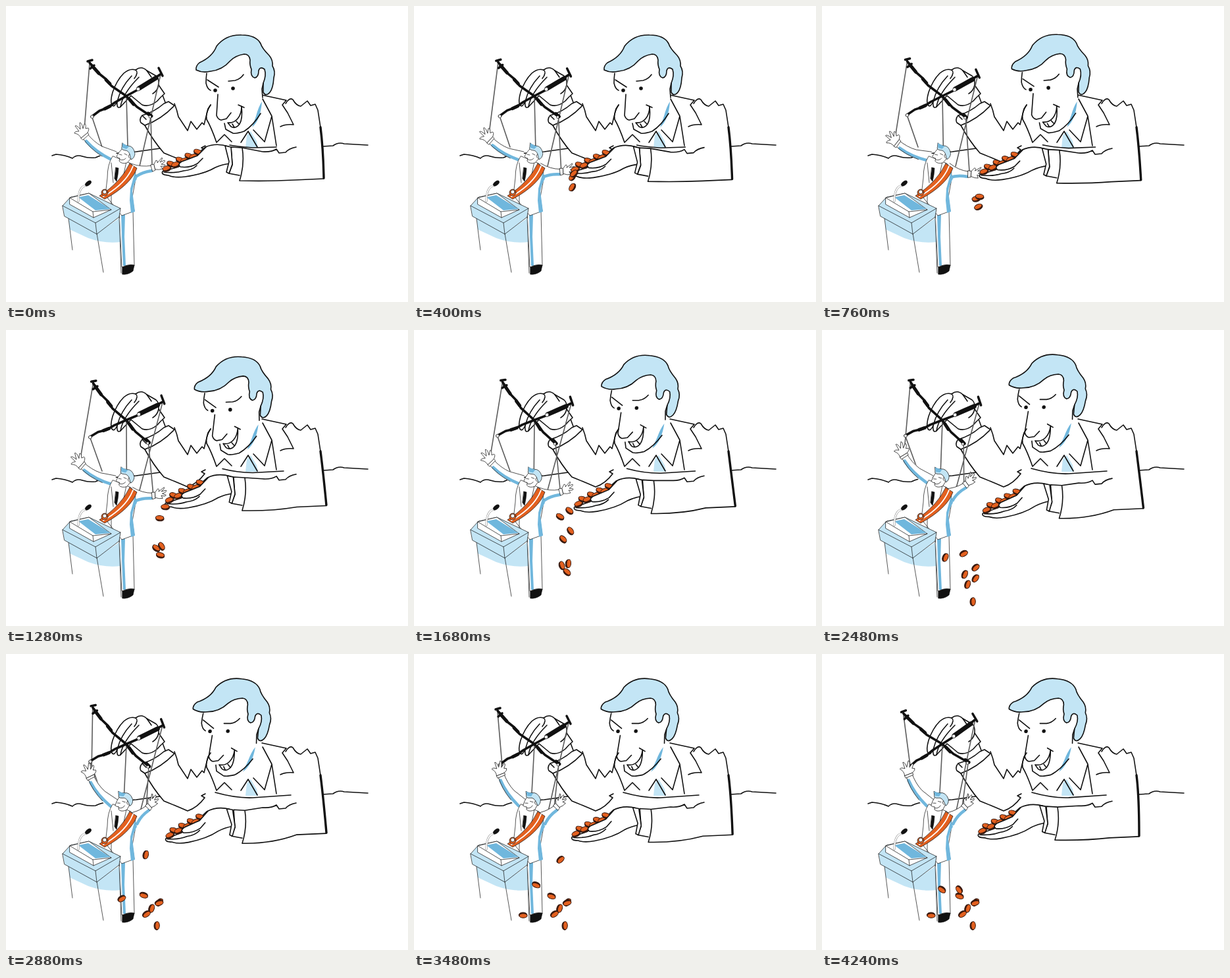
An HTML page that plays this animation: 611x449 px, repeating every 4.28 s.

```html
<!DOCTYPE html>
<html lang="en">
<head>
<meta charset="utf-8">
<title>Puppeteer</title>
<style>
html, body { margin: 0; width: 100%; height: 100%; overflow: hidden; background: #fff; }
svg { display: block; width: 100vw; height: 100vh; }
path, ellipse, circle { fill: none; stroke: #111; stroke-linecap: round; stroke-linejoin: round; }
.big { stroke-width: 1.6; }
.thin path, .thin circle { stroke-width: .7; }
svg .w { fill: #fff; }
svg .sky { fill: #c3e5f5; }
svg .mid { fill: #70b7dd; stroke: none; }
svg .shade { stroke: #70b7dd; stroke-width: 4.5; }
svg .ink { fill: #111; }
svg .red { fill: #e3601f; }
svg .plain { stroke: none; }
svg .stripe { stroke: #fff; stroke-width: 1.8; }
.string { stroke: #5c5c5c; stroke-width: 1.6; }
.coin ellipse { stroke: #38190f; stroke-width: 1; fill: #38190f; }
.coin .red { fill: #e3601f; }
</style>
</head>
<body>
<svg viewBox="0 0 611 449">
  <path class="big" d="M70 227L76 225Q90 226 101 231Q107 225 116 228T136 230Q146 225 160 224L198 221L234 216M481 213L497 212Q505 206 514 209L550 211"/>

  <!-- body -->
  <g class="big">
    <path class="sky plain" d="M366 196L372 190L381 205L383 215H364Z"/>
    <path d="M311 150Q303 162 305 172Q312 184 320 207L332 195L343 206"/>
    <path d="M389 135L426 143L420 150L428 162L437 180Q425 179 417 183M390 141L404 167L393 206L376 188M404 167L411 212M357 207L368 190L382 214"/>
    <path d="M425 148Q431 138 436 142Q441 151 448 152L458 144L463 151L470 149L474 158L478 184"/>
    <path id="base"/>
  </g>

  <!-- head -->
  <g id="head" class="big">
    <path class="w plain" d="M304 102L310 124L322 134L320 168L333 187L345 193L362 190L387 163L390 131L395 98L369 73L335 86Z"/>
    <path class="mid" d="M389 145Q384 152 380 167L374 184Q387 173 389 145Z"/>
    <path class="sky" d="M289 97Q288 91 294 86Q314 77 320 61Q334 43 358 44Q380 44 387 57Q389 64 400 75Q406 82 405 91Q410 99 407 109Q406 125 401 131Q395 138 391 131L391 117Q396 105 393 96Q386 91 384 98Q384 108 378 109Q371 107 373 96Q370 89 371 82Q370 73 362 73Q349 75 341 83Q329 97 311 99Q299 102 289 97Z"/>
    <path d="M305 102Q304 109 304 117Q306 126 311 128M391 117L389 126L390 139M387 163Q376 181 362 190Q350 194 345 193L334 187L332 178"/>
    <path d="M306 112L323 123M338 114L348 113Q356 111 361 104M322 134L320 166Q322 172 327 173L335 171L342 162"/>
    <path class="w" d="M353 150L362 154M358 152Q358 164 352 171Q346 178 337 177L342 183Q349 187 355 179Q360 171 358 152M344 179L347 184M350 175L354 179"/>
    <circle class="ink plain" cx="318" cy="128" r="2.8"/>
    <circle class="ink plain" cx="345" cy="125" r="2.8"/>
  </g>

  <!-- raised arm and hand -->
  <g class="big">
    <path d="M256 148Q260 158 262 168L276 189L281 175L290 187L298 177L301 180L307 156L311 150M211 181Q224 205 240 223Q260 231 276 238Q291 233 302 218L297 215L303 212"/>
    <path class="w" d="M205 177Q202 171 207 166Q225 161 240 148L247 145L256 151Q236 172 211 181Z"/>
    <path d="M236 130L242 146M207 166L213 172"/>
    <path class="w" d="M161 150Q158 145 162 131Q168 113 179 102Q188 94 197 97Q206 90 214 98L228 106Q233 110 232 120L241 133Q234 139 230 144Q218 154 207 150L190 136L174 153Q168 157 169 145Q164 155 161 150Z"/>
    <path d="M169 145Q174 124 191 106M174 153Q177 133 202 108M197 97Q202 101 195 110M214 98L221 108M232 120Q230 129 223 133"/>
  </g>

  <path id="strings" class="string"/>
  <g id="cross">
    <path stroke-width="3.6" d="M127 86L142 103L152 111L160 121L182 136L199 153L220 167M130 168L142 159L155 154L166 146L182 137L204 125L234 104"/>
    <path stroke-width="5" d="M131 91L141 102M152 112L158 118M150 156L158 152M188 142L194 149M216 163L221 167"/>
    <path stroke-width="7" d="M202 125L215 117L228 109"/>
    <path stroke-width="3.5" d="M124 84L131 82M128 95L134 90M232 94L238 106"/>
    <g class="thin">
      <circle class="w" cx="131" cy="168" r="2.4"/><circle class="w" cx="219" cy="168" r="2"/>
      <circle class="w" cx="201" cy="126" r="2.8"/>
    </g>
  </g>

  <!-- puppet -->
  <g class="thin">
    <path class="w" d="M172 312L176 396L195 394L193 311Z"/>
    <path class="mid" d="M175 316L181 316L180 350L182 394L178 394L176 350Z"/>
    <path class="ink" d="M177 396Q186 391 195 393L193 402Q186 408 177 407Z"/>
    <g id="armL">
      <path class="w plain" d="M122 193L145 213L168 221L164 242L144 228L118 201Z"/>
      <path class="shade" d="M122 205Q136 221 160 233"/>
      <path d="M123 193Q133 206 146 213L168 221M117 201Q127 216 146 228"/>
      <path class="w" d="M114 200L124 192L126 195L117 203Z"/>
      <path class="w" d="M114 200Q111 194 104 193Q104 190 111 190L105 182Q107 180 113 187L112 177Q115 176 117 186L119 179Q122 178 121 186L125 185Q127 187 124 192Z"/>
    </g>
    <g id="armR">
      <path class="w plain" d="M190 239L208 243L222 242L223 250L196 262Z"/>
      <path class="shade" d="M196 260Q206 252 221 250"/>
      <path d="M190 239Q206 245 221 242"/>
      <path class="w" d="M220 241L225 240L227 249L223 251Z"/>
      <path class="w" d="M225 240L228 234Q231 234 230 238L237 230Q239 231 234 237L241 234Q243 236 236 240L242 241Q242 244 235 243L238 247Q233 249 227 248Z"/>
    </g>
    <path class="w" d="M162 228Q154 240 154 261L151 287L163 302L176 318L195 311L192 290L196 268Q200 250 190 239L178 234Z"/>
    <path class="mid" d="M196 252L199 262Q194 270 192 281L196 312L190 314L188 295L189 277Z"/>
    <path d="M160 238L163 268M183 236L176 269M160 277V300"/>
    <path class="ink" d="M167 245L171 246L170 256L168 266L165 262Z"/>
    <path class="red" d="M188 239L199 246Q190 271 150 293L142 288Q174 268 188 239Z"/>
    <path class="stripe" d="M193 243Q183 269 148 289"/>
    <circle class="red" cx="150" cy="283" r="5"/><circle class="w" cx="150" cy="282" r="3"/>
    <g id="face">
      <path class="w" d="M177 216Q171 222 168 228Q170 231 173 231L172 235Q175 240 184 238L191 230L187 216Z"/>
      <path class="sky" d="M177 208Q180 212 185 212Q194 212 196 224Q195 231 190 233L188 225Q186 219 181 219Q174 218 176 214Z"/>
      <path class="mid" d="M177 208Q182 211 187 213L183 217L177 215Z"/>
      <path d="M172 225L176 226M180 224L184 226M173 233Q179 235 182 231M188 225Q184 227 188 231"/>
    </g>
  </g>

  <!-- lectern -->
  <g class="thin">
    <path class="w plain" d="M95 322L138 344L173 322L175 405H148L101 370Z"/>
    <path class="sky plain" d="M95 322L138 345L172 322L174 358Q150 361 125 352L97 339Z"/>
    <path d="M95 322L101 370M138 345L148 404M172 320L175 405"/>
    <path class="sky" d="M86 303L98 290L126 284L174 307L172 320L138 346L89 319Z"/>
    <path d="M86 303L136 329L174 307M136 329L138 346"/>
    <path class="w" d="M97 291L126 284L160 309L133 321L97 301Z"/>
    <path class="mid" d="M110 290L125 287L159 308L136 310Z"/>
    <path d="M97 291L132 312L160 309M132 312L133 321"/>
    <path style="stroke:#888;stroke-width:3" d="M122 272Q110 274 110 296"/>
    <path class="stripe" d="M122 272Q110 274 110 296"/>
    <ellipse class="ink" cx="125" cy="269" rx="5" ry="2.6" transform="rotate(-38 125 269)"/>
  </g>

  <!-- giving arm -->
  <g class="big">
    <path id="sleeve" class="w"/>
    <path id="edge" style="stroke-width:3.4"/>
    <g id="hand">
      <path class="w" d="M238 251Q235 256 247 257Q256 261 272 259Q301 255 318 245Q329 240 341 239L338 213Q319 207 303 214L286 228L262 244Z"/>
      <path d="M240 252Q258 254 270 250Q283 249 290 242"/>
      <g id="heap"></g>
      <path class="w" d="M304 214L291 227Q278 232 267 236Q260 240 265 244Q279 246 291 239L299 231"/>
      <path class="w" d="M333 212L342 214L344 240L339 254L335 252L339 236Z"/>
    </g>
  </g>
  <g id="falling"></g>
</svg>

<script>
const LOOP = 4280, STEP = 40, HEAP = 8;
const pivots = { cross: [182, 136], armL: [168, 228], armR: [193, 252], face: [176, 240], head: [420, 44] };
// launch time and resting place
const drops = [
  [150, 230, 412], [316, 222, 386], [360, 234, 377], [1000, 214, 395], [1200, 233, 378],
  [1500, 166, 397], [1600, 209, 368], [2600, 182, 358], [3120, 208, 358]
];

const $ = id => document.getElementById(id);
const draw = (id, d) => $(id).setAttribute('d', d);
const place = (el, x, y, a) => el.setAttribute('transform', `translate(${x} ${y}) rotate(${a})`);
const mix = (a, b, u) => a + (b - a) * u;
const clamp = u => Math.min(Math.max(u, 0), 1);

// eases a value from a through b, with stops given as [time, value]
function ease(t, first, ...stops) {
  let [from, value] = first;
  for (const [to, next] of stops) {
    const u = clamp((t - from) / (to - from));
    value = mix(value, next, u * u * (3 - 2 * u));
    from = to;
  }
  return value;
}

const turns = {
  cross: t => ease(t, [0, 0], [2120, 9], [LOOP, -4]),
  armL: t => ease(t, [0, 0], [700, -12.5], [3600, 18.5]),
  armR: t => ease(t, [0, 0], [700, 18], [3000, -28]),
  face: t => ease(t, [0, 0], [3600, -12]),
  head: t => ease(t, [400, 0], [2100, 5.8])
};
const handX = t => ease(t, [0, 0], [2120, 6], [LOOP, -1]);
const handY = t => ease(t, [0, 0], [2950, 28.5], [LOOP, 22]);

const coin = '<g class="coin"><ellipse cx=".4" cy="1.4" rx="6.2" ry="3.6"/><ellipse class="red" rx="6.2" ry="3.3"/></g>';
$('falling').innerHTML = coin.repeat(drops.length);
$('heap').innerHTML = coin.repeat(HEAP);
for (let i = 0; i < HEAP; i++) {
  const side = i % 2 ? -1 : 1;
  place($('heap').children[i], 244 + 6.8 * i, 244 - 3 * i + 2 * side, -20 * side);
}

function turned(name, x, y, t) {
  const [cx, cy] = pivots[name], a = turns[name](t) * Math.PI / 180;
  const c = Math.cos(a), s = Math.sin(a);
  return [cx + (x - cx) * c - (y - cy) * s, cy + (x - cx) * s + (y - cy) * c];
}

// coins leave the fingertips, slow down a little and tumble until they rest
function drop(el, i, t) {
  const [start, x, y] = drops[i], age = t - start;
  el.style.display = age < 0 ? 'none' : '';
  if (age < 0) return;
  const top = 246 + handY(start);
  const p = clamp(.354 * age ** .795 / (y - top));
  place(el, mix(244, x, p ** .7), mix(top, y, p), 90 + 18 * i - 180 * (1 - p));
}

function render(t) {
  for (const name in pivots)
    $(name).setAttribute('transform', `rotate(${turns[name](t)} ${pivots[name]})`);

  const line = (a, b) => `M${a}L${b}`;
  const bar = (x, y) => turned('cross', x, y, t);
  draw('strings', line(bar(127, 88), turned('armL', 119, 187, t)) + line(bar(131, 169), [146, 214])
    + line([183, 138], turned('face', 185, 212, t)) + line(bar(235, 104), [203, 243])
    + line(bar(220, 168), turned('armR', 222, 241, t)));

  const dx = handX(t), dy = handY(t), cy = dy * .78;
  const ex = 483 + dx, ey = 262 + 15 * t / LOOP;
  $('hand').setAttribute('transform', `translate(${dx} ${cy}) rotate(${-dy * .13} 341 238)`);
  const at = (x, y) => [x + dx, y + cy];
  const fold = (x, y) => [x, y + dy * .42];
  draw('sleeve', `M${fold(441, 214)}Q${fold(430, 216)} ${fold(425, 222)}L${fold(415, 223)}L${fold(411, 217)}`
    + `Q${fold(403, 222)} ${fold(390, 221)}L${at(359, 215)}L${at(342, 214)}L${at(344, 241)}L${at(339, 254)}L${at(355, 257)}`
    + `M${at(359, 215)}Q${at(363, 240)} ${at(355, 265)}Q${at(400, 266)} ${ex - 45} ${ey + 2}L${ex} ${ey}`);
  draw('edge', `M478 184Q482 215 ${ex} ${ey - 1}`);
  const sag = clamp(dy / 23);
  draw('base', `M${340 - 22 * sag} ${211 - sag}Q350 ${213 + 6 * sag} 375 ${215 + 3 * sag}L${411 + 22 * sag} 214`);

  drops.forEach((_, i) => drop($('falling').children[i], i, t));
}

function tick() {
  render(Math.floor(performance.now() % LOOP / STEP) * STEP);
  requestAnimationFrame(tick);
}
tick();
</script>
</body>
</html>
```
